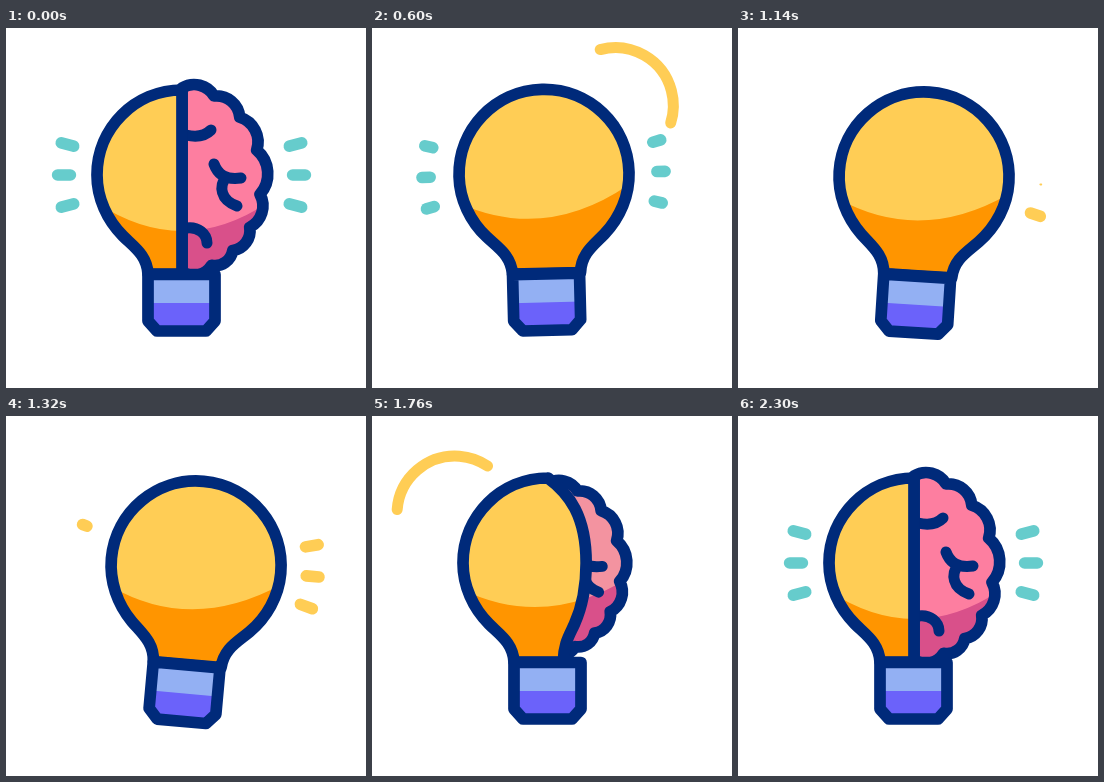
An HTML page with a canvas for the animation above (2.4 s loop, 360 by 360 pixels).

```html
<!DOCTYPE html>
<html lang="en">
<head>
<meta charset="utf-8">
<title>Bulb and brain</title>
<style>
html, body { margin: 0; width: 100%; height: 100%; overflow: hidden; background: #fff; }
canvas { display: block; width: 360px; height: 360px; }
</style>
</head>
<body>
<canvas width="360" height="360"></canvas>
<script>
const ctx = document.querySelector('canvas').getContext('2d');
const LOOP = 2400, CX = 176, RAD = Math.PI / 180;
const NAVY = '#002a7a', YELLOW = '#ffcd55', ORANGE = '#ff9500', TEAL = '#66cccc';

const FOLDS = new Path2D(`M180 107 Q196 111 205 102 M208 136 C212 147 220 152 235 150
  M231 178 C214 172 213 158 220 149 M180 200 C192 198 201 206 201 215`);
const BASE = new Path2D('M142 246.5 H209 V293 L200 303 H151 L142 293 Z');
const BRAIN = brainPath([-66, -43, -19, 9, 31, 50, 68, 90]);
const SWINGS = [[200, 0], [450, -6], [760, 3.5], [940, -1.5], [1260, 6], [1540, -1], [1700, 0]];

const mix = (a, b, u) => a + (b - a) * u;
const ramp = (t, start, end) => Math.min(1, Math.max(0, (t - start) / (end - start)));
const ease = (t, start, end) => {
  const u = ramp(t, start, end);
  return u * u * (3 - 2 * u);
};

// Round bumps between notches that lie on an ellipse, given by their angles
function brainPath(notches) {
  let x = CX, y = 60, d = `M${x} ${y}`;
  for (const a of notches) {
    const nx = CX + 79 * Math.cos(a * RAD), ny = 152 + 92 * Math.sin(a * RAD);
    const r = 0.7 * Math.hypot(nx - x, ny - y);
    d += `A${r} ${r} 0 0 1 ${nx} ${ny}`;
    [x, y] = [nx, ny];
  }
  return new Path2D(d + 'Z');
}

// One side of the glass, squeezed towards the middle by s; negative s is the left side
function glassSide(s) {
  const x = d => CX + d * s, top = 62 + 28 * (1 - Math.abs(s));
  return `M${CX} 62 C${x(47)} ${top} ${x(85)} 100 ${x(85)} 147
    C${x(85)} 170 ${x(75)} 192 ${x(59)} 208 C${x(48)} 219 ${x(35)} 227 ${x(34)} 246 H${CX}`;
}

function stroke(path, color = NAVY, width = 11.7) {
  ctx.strokeStyle = color;
  ctx.lineWidth = width;
  ctx.stroke(path);
}

function fill(path, color) {
  ctx.fillStyle = color;
  ctx.fill(path);
}

function fillInside(clip, path, color) {
  ctx.save();
  ctx.clip(clip);
  fill(path, color);
  ctx.restore();
}

// Rays run anticlockwise: up the right side, then down the left
function drawRay(i, size, color) {
  if (size <= 0) return;
  const side = i < 3 ? 1 : -1, row = side * (1 - i % 3);
  const x = 175.5 + side * (117.5 - 3.5 * Math.abs(row)), y = 147 + 30.5 * row;
  const a = 15 * row * side * RAD, dx = Math.cos(a) * 6.4 * size, dy = Math.sin(a) * 6.4 * size;
  stroke(new Path2D(`M${x - dx} ${y - dy} L${x + dx} ${y + dy}`), color, 11.6 * Math.min(1, size * 3));
}

// A streak whose head, then tail, runs between two angles; both are given as progress
function drawStreak(x, y, from, to, head, tail) {
  if (head <= tail) return;
  const p = new Path2D();
  p.arc(x, y, 58, mix(from, to, head) * RAD, mix(from, to, tail) * RAD, false);
  stroke(p, YELLOW, 11);
}

function drawBrain(t, s, shade) {
  const warm = t > 1500 ? 1 - ramp(t, 1740, 1900) : 0;
  const z = 1 - 0.18 * s, m = new DOMMatrix([z, 0, 0, z, CX * (1 - z), 155 * (1 - z)]);
  const brain = new Path2D(), folds = new Path2D();
  brain.addPath(BRAIN, m);
  folds.addPath(FOLDS, m);
  fill(brain, `rgb(${mix(253, 241, warm)}, ${mix(126, 150, warm)}, 160)`);
  fillInside(brain, shade, '#d9508a');
  stroke(folds, NAVY, 11);
  stroke(brain);
}

function draw(t) {
  const s = ease(t, 200, 520) - ease(t, 1550, 1945);
  const tilt = SWINGS.slice(1).reduce((sum, [end, to], i) =>
    sum + (to - SWINGS[i][1]) * ease(t, SWINGS[i][0], end), 0);
  const k = Math.min(1, s / 0.45);
  const shade = new Path2D(`M85 171 Q176 ${mix(235, 218, k)} 267 ${mix(171, 155, k)} V260 H85 Z`);

  ctx.fillStyle = '#fff';
  ctx.fillRect(0, 0, 360, 360);
  ctx.save();
  ctx.lineCap = ctx.lineJoin = 'round';
  ctx.translate(150, 305);
  ctx.rotate(tilt * RAD);
  ctx.translate(-150, -305);

  const teal = 1 - ramp(t, 500, 780) + ramp(t, 1950, 2200);
  for (let i = 0; i < 6; i++) {
    const on = 1060 + i * 75, off = 1500 + i * 25;
    drawRay(i, teal, TEAL);
    drawRay(i, ramp(t, on, on + 100) - ramp(t, off, off + 90), YELLOW);
  }

  drawStreak(249, 80, 20, -150, ramp(t, 230, 740), ramp(t, 600, 750));
  drawStreak(83, 98, -55, -190, ramp(t, 1560, 1785), ramp(t, 1760, 1920));

  if (s < 0.97) drawBrain(t, s, shade);

  const bulb = new Path2D(glassSide(-1) + glassSide(s));
  fill(bulb, YELLOW);
  fillInside(bulb, shade, ORANGE);
  stroke(bulb);

  fill(BASE, '#93b0f3');
  fillInside(BASE, new Path2D('M136 275 H215 V310 H136 Z'), '#6b62fa');
  stroke(BASE);
  ctx.restore();
}

const start = performance.now();
function tick() {
  draw((performance.now() - start) % LOOP);
  requestAnimationFrame(tick);
}
tick();
</script>
</body>
</html>
```
